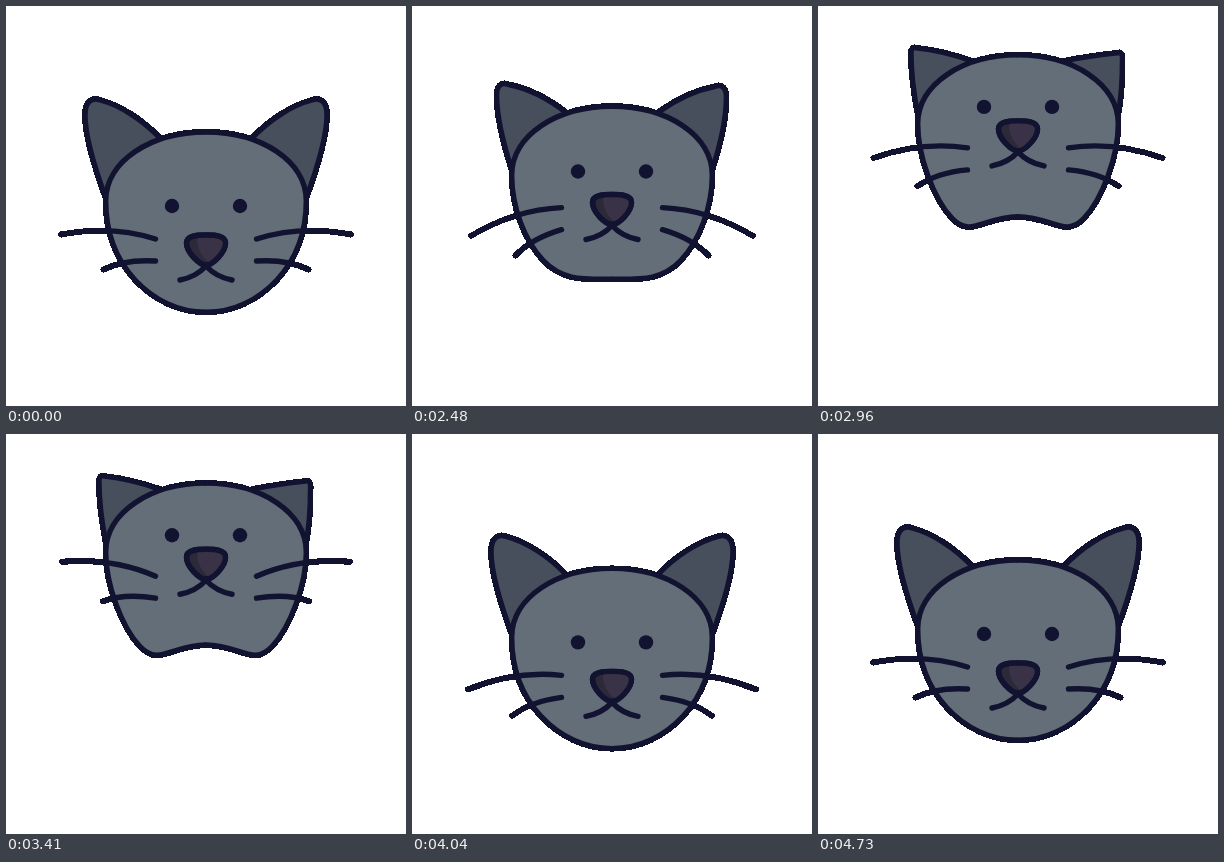
Write an HTML page that moves like this. It is 400 by 400 pixels and loops after 5120 ms.

```html
<!DOCTYPE html>
<html lang="en">
<head>
<meta charset="utf-8">
<title>Cat</title>
<style>
  html, body { margin: 0; width: 100%; height: 100%; overflow: hidden; background: #fff; }
  svg { display: block; width: 100%; height: 100%; }
  .line { stroke: #121331; stroke-width: 5.4; stroke-linecap: round; stroke-linejoin: round; }
</style>
</head>
<body>
<svg viewBox="0 0 400 400" fill="none">
  <!-- Hard outer edge: any clearly covered pixel becomes opaque. -->
  <filter id="crisp" filterUnits="userSpaceOnUse" x="0" y="0" width="400" height="400" color-interpolation-filters="sRGB">
    <feComponentTransfer><feFuncA type="discrete" tableValues="0 1 1 1 1"/></feComponentTransfer>
  </filter>
  <g filter="url(#crisp)">
    <g id="ears" class="line" fill="#464f5b">
      <path id="leftEar"/>
      <path id="rightEar" transform="matrix(-1 0 0 1 400 0)"/>
    </g>
    <g id="half">
      <path id="cheek" class="line" fill="#646e78"/>
      <circle id="eye" cx="166" cy="200" r="7.2" fill="#121331"/>
      <g id="whiskers" class="line">
        <path id="upper" d="M55 228.5Q105 219 149.5 233"/>
        <path id="lower" d="M97.5 263.5Q119 253 149.5 255"/>
      </g>
    </g>
    <use href="#half" transform="matrix(-1 0 0 1 400 0)"/>
    <g id="muzzle" class="line">
      <path id="nose" d="M200 229C210 229 219.5 230 219.5 237C219.5 246 207 259 200 259C193 259 180.5 246 180.5 237C180.5 230 190 229 200 229Z" fill="#2c2a38"/>
      <path d="M192 230C189 240 195 250 203 257C210 254 218 245 218 237C218 231 206 230 192 230Z" fill="#3a3347" stroke="none"/>
      <use href="#nose" fill-opacity="0"/>
      <path d="M174 274Q190 271 200 260Q210 271 226 274"/>
    </g>
  </g>
</svg>
<script>
const LOOP = 5120, START = 2000, STEP = 30;
const $ = id => document.getElementById(id);

// Smooth rise from 0 to 1 between two steps.
function ease(n, from, to) {
  const x = Math.min(1, Math.max(0, (n - from) / (to - from)));
  return x * x * (3 - 2 * x);
}

// The ear gets narrower, lower and more pointed as the head lifts.
function earPath(lift, droop) {
  const x = 79 + 14 * lift + droop / 2;
  const y = 94 + 25 * lift + droop;
  const r = 15 - 10 * lift;
  return `M100 ${193 - 6 * lift}
    C${86 + 10 * lift} ${155 + 12 * lift} ${x} ${y + 31 - 8 * lift} ${x} ${y + r}
    C${x} ${y + r * 0.1} ${x + r * 0.45} ${y - r * 0.2} ${x + r} ${y}
    C${x + r + 20} ${y + 5 - 3 * lift} 137 ${114 + 12 * lift + droop / 2} 154 132`;
}

// Left half of the face; its chin folds upwards as the head lifts.
function cheekPath(lift) {
  return `M200 126C145 126 99.7 155 99.7 195
    C99.7 227 ${110.5 + 5 * lift} ${254 + 16 * lift} ${129 + 5 * lift} ${274 + 15.5 * lift}
    C${147.5 + 5.5 * lift} ${294 + 15.5 * lift} ${172.5 - 7.5 * lift} ${306.3 - 18 * lift} 200 ${306.3 - 18.5 * lift}`;
}

function draw(t) {
  const n = Math.max(0, Math.floor((t - START) / STEP));
  const dip = 8.4 * (ease(n, 0, 8) - ease(n, 68, 75));
  const lift = ease(n, 8, 26.5) - ease(n, 46.3, 68.2);
  const swing = 20 * ease(n, 0, 16) - 28 * ease(n, 16, 53) + 20 * ease(n, 53, 70) - 12 * ease(n, 70, 91);

  // Nearer features travel further, which tilts the face upwards.
  const rise = { ears: 85.5, cheek: 85.5, whiskers: 99.5, eye: 107.5, muzzle: 122.5 };
  for (const id in rise) $(id).setAttribute('transform', `translate(0 ${dip - rise[id] * lift})`);

  $('leftEar').setAttribute('d', earPath(lift, 0));
  $('rightEar').setAttribute('d', earPath(lift, 5 * lift));
  $('cheek').setAttribute('d', cheekPath(lift));
  $('upper').setAttribute('transform', `rotate(${-swing} 149.5 233)`);
  $('lower').setAttribute('transform', `rotate(${-swing} 149.5 255)`);
}

function tick() {
  draw(performance.now() % LOOP);
  requestAnimationFrame(tick);
}
tick();
</script>
</body>
</html>
```
